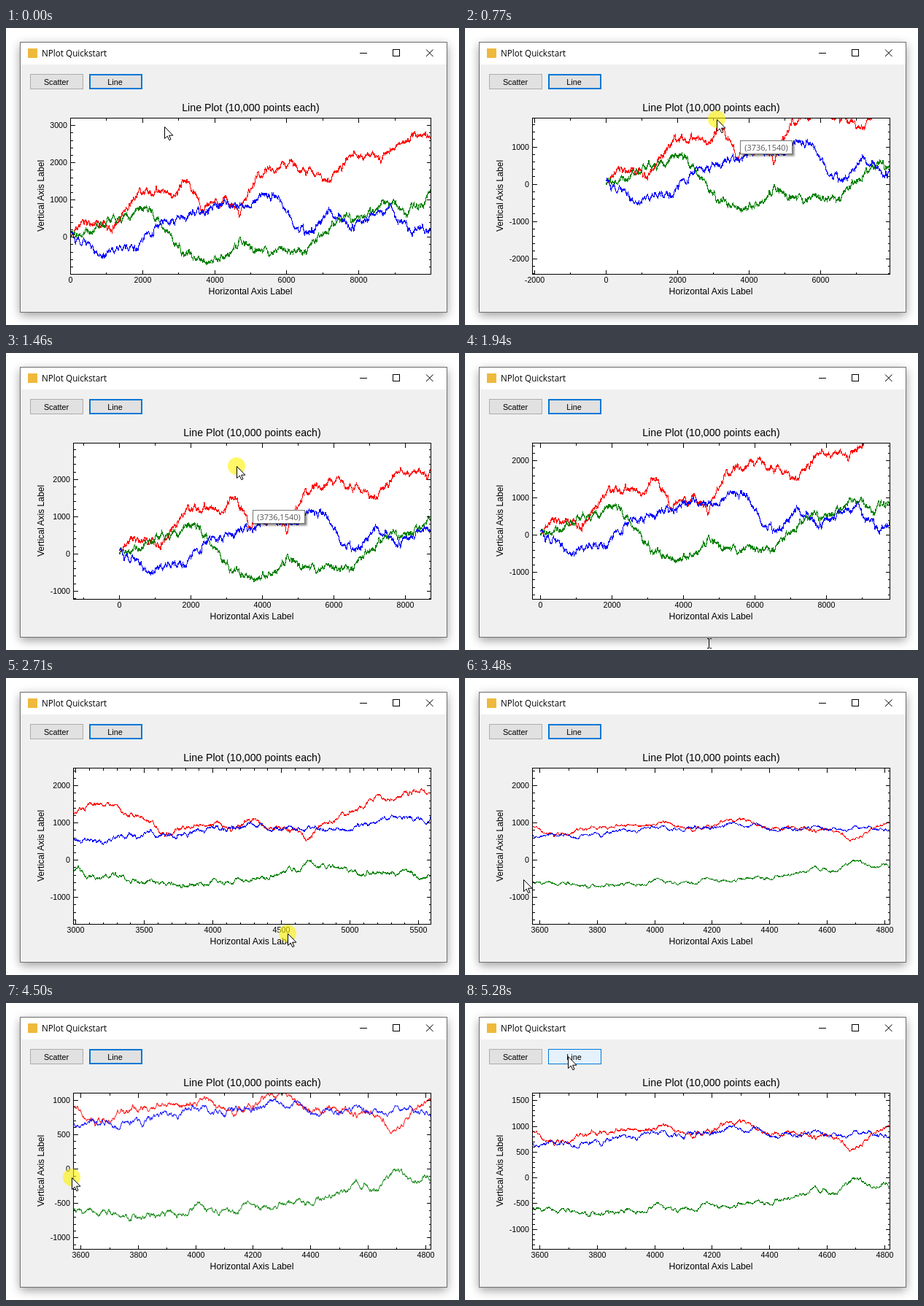
These frames come from a looping animation (621x407 px, 5.36 s). An HTML page:

```html
<!DOCTYPE html>
<html lang="en">
<head>
<meta charset="utf-8">
<title>Line Plot</title>
<style>
  html, body { margin: 0; width: 100%; height: 100%; overflow: hidden; background: #fff; }
  svg { display: block; width: 621px; height: 407px; }
  text { font-family: "Liberation Sans", Arial, sans-serif; }
  .ui { font-family: "Open Sans", "Noto Sans", sans-serif; }
  .mid { text-anchor: middle; }
  .crisp { shape-rendering: crispEdges; fill: none; stroke: #000; }
  .walk { fill: none; stroke-width: 1; stroke-linejoin: bevel; vector-effect: non-scaling-stroke; shape-rendering: crispEdges; }
</style>
</head>
<body>
<svg viewBox="0 0 621 407">
  <defs>
    <filter id="shadow" x="-10%" y="-10%" width="120%" height="125%">
      <feDropShadow dx="0" dy="4" stdDeviation="7" flood-color="#000" flood-opacity=".4"/>
    </filter>
    <filter id="tipShadow" x="-10%" y="-20%" width="125%" height="160%">
      <feDropShadow dx="2.5" dy="2.5" stdDeviation="1.2" flood-color="#000" flood-opacity=".45"/>
    </filter>
    <clipPath id="plotClip"><rect id="clipBox" y="124" height="213"/></clipPath>
  </defs>

  <rect x="19.5" y="19.5" width="585" height="370" fill="#f0f0f0" filter="url(#shadow)"/>
  <rect x="19.5" y="19.5" width="585" height="370" fill="#f0f0f0" stroke="#707070"/>
  <rect x="20" y="20" width="584" height="30" fill="#fff"/>
  <rect x="30" y="28" width="13" height="13" fill="#efb93c"/>
  <text class="ui" x="49" y="39" font-size="11.7">NPlot Quickstart</text>
  <path class="crisp" d="M485 34.5h10M530.5 29.5h9v9h-9z"/>
  <path d="M576 29.5l9.5 9.5m0-9.5l-9.5 9.5" stroke="#000" fill="none"/>

  <rect x="33.5" y="63.5" width="72" height="20" fill="#e1e1e1" stroke="#adadad"/>
  <text class="mid" x="69" y="78" font-size="10.8">Scatter</text>
  <rect id="lineButton" stroke="#0078d7"/>
  <text class="mid" x="149.5" y="78" font-size="10.8">Line</text>

  <text id="title" class="mid" y="114" font-size="14.2">Line Plot (10,000 points each)</text>
  <text id="xTitle" class="mid" y="365" font-size="12.3">Horizontal Axis Label</text>
  <text class="mid" transform="translate(52 230) rotate(-90)" font-size="12.1">Vertical Axis Label</text>

  <rect id="plotBack" y="123.5" height="214" fill="#fff"/>
  <g id="walks" clip-path="url(#plotClip)"></g>
  <path id="axes" class="crisp"/>
  <g id="labels" font-size="10.7"></g>

  <g id="tip">
    <rect x=".5" y=".5" width="71" height="18" fill="#fff" stroke="#767676" filter="url(#tipShadow)"/>
    <text id="tipText" class="ui mid" x="36" y="13.5" font-size="11" fill="#575757"></text>
  </g>
  <g id="pointer">
    <circle id="halo" r="12" fill="#fff200" opacity=".6"/>
    <path id="arrow" d="M.5.5V16.6L4.2 13.1L6.8 18.7L9 17.7L6.6 12.2H11.9Z" fill="#fff" stroke="#000"/>
    <path id="beam" class="crisp" d="M-3 -6.5h2.5v13h-2.5M3 -6.5h-2.5M3 6.5h-2.5"/>
  </g>
</svg>
<script>
const $ = id => document.getElementById(id);
const set = (el, attrs) => { for (const k in attrs) el.setAttribute(k, attrs[k]); };
const clamp = (v, lo, hi) => Math.min(hi, Math.max(lo, v));
const make = (tag, parent, attrs) => {
  const el = document.createElementNS("http://www.w3.org/2000/svg", tag);
  set(el, attrs);
  return parent.appendChild(el);
};

const LOOP = 5360, STEP = LOOP / 69, LEAD = 20; // the screen recorder's frame rhythm
const TOP = 123.5, BOTTOM = 337.5, RIGHT = 582.5, COUNT = 9999;
const DRAG = { from: 300, to: 1610, x: 275, y: 207, lag: 100 };
const ZOOM_X = { from: 2330, to: 2980, at: 305 };
const ZOOM_Y = { from: 3640, to: 4680, at: 275.5 };
const ZOOM_RATE = 60; // pixels of drag per e-fold

// Pointer key poses: [time, x, y]
const poses = [
  [0, 217, 135], [300, 275, 207], [540, 370, 208], [677, 377, 134.5], [777, 345, 125], [910, 264, 143],
  [1065, 244.5, 220], [1165, 276, 247], [1350, 340, 205], [1500, 310, 152], [1610, 286, 170],
  [1942, 335, 398], [2330, 305, 347], [2980, 430, 352], [3495, 80, 276], [3640, 83, 275.5],
  [4180, 90, 215], [4350, 90, 215], [4505, 90, 238.5], [4680, 92, 256], [4820, 200, 206], [5282, 141, 73]
];

// Cubic path through the poses that rests at every turning point
function pointerAt(t) {
  const last = poses.length - 1;
  const i = clamp(poses.findLastIndex(p => p[0] <= t), 0, last - 1);
  const slope = (j, k) => {
    if (j === 0 || j === last) return 0;
    const [a, b, c] = [poses[j - 1], poses[j], poses[j + 1]];
    return (b[k] - a[k]) * (c[k] - b[k]) <= 0 ? 0 : (c[k] - a[k]) / (c[0] - a[0]);
  };
  const a = poses[i], b = poses[i + 1], h = b[0] - a[0], u = clamp((t - a[0]) / h, 0, 1);
  const along = k => {
    const m0 = slope(i, k) * h, m1 = slope(i + 1, k) * h, rise = b[k] - a[k];
    return a[k] + u * (m0 + u * (3 * rise - 2 * m0 - m1 + u * (m0 + m1 - 2 * rise)));
  };
  return { x: along(1), y: along(2) };
}

function random(seed) {
  return () => {
    seed = (seed + 0x6D2B79F5) | 0;
    let r = Math.imul(seed ^ seed >>> 15, 1 | seed);
    r = r + Math.imul(r ^ r >>> 7, 61 | r) ^ r;
    return ((r ^ r >>> 14) >>> 0) / 4294967296;
  };
}

// Mean-reverting random walk around straight runs between turning points
function addWalk(color, seed, turns) {
  const rnd = random(seed);
  let d = "", noise = 0, k = 0;
  for (let x = 0; x <= COUNT; x++) {
    if (x > turns[k + 1][0]) k++;
    const [x0, y0] = turns[k], [x1, y1] = turns[k + 1];
    const y = y0 + (y1 - y0) * (x - x0) / (x1 - x0) + noise;
    d += `${x ? "L" : "M"}${x} ${y.toFixed(1)}`;
    noise = noise * .985 + (rnd() - .5) * 44;
  }
  return make("path", $("walks"), { class: "walk", stroke: color, d });
}

const walks = [
  addWalk("#f00", 11, [[0, 0], [400, 580], [1150, 180], [1900, 1220], [2900, 1200], [3230, 1540], [3650, 750],
    [4350, 1010], [4700, 620], [5200, 1660], [6150, 2040], [7200, 1500], [7700, 2160], [8500, 2150],
    [9860, 2830], [10000, 2620]]),
  addWalk("#008000", 23, [[0, 50], [700, 200], [1450, 620], [2100, 850], [2500, 380], [3000, -300], [3720, -730],
    [4250, -640], [4720, -100], [5000, -340], [6500, -380], [7300, 380], [8000, 600], [8700, 920],
    [9500, 750], [10000, 1180]]),
  addWalk("#00f", 37, [[0, 100], [800, -500], [1800, -180], [2500, 360], [3600, 630], [4200, 970], [4700, 760],
    [5600, 1180], [6300, 190], [6750, 150], [7200, 700], [7800, 250], [8900, 780], [9500, 100],
    [9800, 250], [10000, 70]])
];

function ticks(lo, hi) {
  const rough = (hi - lo) / 7, power = 10 ** Math.floor(Math.log10(rough));
  const lead = [1, 2, 5, 10].find(m => m * power >= rough);
  const step = lead * power, parts = lead === 2 ? 2 : 5, out = [];
  for (let i = Math.ceil(lo * parts / step); i <= hi * parts / step; i++)
    out.push({ value: Math.round(i * step / parts), major: i % parts === 0 });
  return out;
}

function viewAt(t) {
  const grab = pointerAt(clamp(t - DRAG.lag, DRAG.from, DRAG.to));
  let left = -(grab.x - DRAG.x) * COUNT / 494, span = COUNT;
  const zoomX = Math.exp((pointerAt(clamp(t, ZOOM_X.from, ZOOM_X.to)).x - ZOOM_X.at) / ZOOM_RATE);
  const center = left + (ZOOM_X.at - 92.5) / 490 * span;
  left = center - (center - left) / zoomX;
  span /= zoomX;

  const zoomY = Math.exp((ZOOM_Y.at - pointerAt(clamp(t, ZOOM_Y.from, ZOOM_Y.to)).y) / ZOOM_RATE);
  const zero = 286.6 + grab.y - DRAG.y;
  return { grab, left, span, ky: .051 * zoomY, y0: ZOOM_Y.at + (zero - ZOOM_Y.at) * zoomY };
}

function drawPlot({ left, span, ky, y0 }) {
  const yTicks = ticks((y0 - BOTTOM) / ky, (y0 - TOP) / ky);
  const wide = yTicks.some(k => k.major && String(k.value).length > 4);
  const x = wide ? 92.5 : 88.5, width = RIGHT - x, kx = width / span, x0 = x - left * kx;

  walks.forEach(w => w.setAttribute("transform", `matrix(${kx} 0 0 ${-ky} ${x0} ${y0})`));
  set($("clipBox"), { x, width });
  set($("plotBack"), { x, width });
  $("title").setAttribute("x", x + width / 2);
  $("xTitle").setAttribute("x", x + width / 2 - .5);

  const labels = $("labels");
  labels.textContent = "";
  let d = `M${x} ${TOP}H${RIGHT}V${BOTTOM}H${x}Z`;
  for (const { value, major } of ticks(left, left + span)) {
    const px = Math.floor(x0 + value * kx) + .5, size = major ? 6 : 3;
    d += `M${px} ${TOP}v${size}M${px} ${BOTTOM}v${-size}`;
    if (major) make("text", labels, { x: px, y: 349, class: "mid" }).textContent = value;
  }
  for (const { value, major } of yTicks) {
    const py = Math.floor(y0 - value * ky) + .5, size = major ? 6 : 3;
    d += `M${x} ${py}h${size}M${RIGHT} ${py}h${-size}`;
    if (major) make("text", labels, { x: x - 4.5, y: py + 3.7, "text-anchor": "end" }).textContent = value;
  }
  $("axes").setAttribute("d", d);
  return wide;
}

function render(t) {
  const view = viewAt(t), wide = drawPlot(view), p = pointerAt(t);
  const show = (id, on) => $(id).setAttribute("visibility", on ? "visible" : "hidden");
  const within = ({ from, to }, extra = 0) => t >= from && t <= to + extra;

  show("tip", within(DRAG, DRAG.lag));
  $("tip").setAttribute("transform", `translate(${Math.round(view.grab.x)} ${Math.round(view.grab.y + 19)})`);
  $("tipText").textContent = `(${wide ? 3736 : 3792},1540)`;

  const overText = p.y > 390;
  show("arrow", !overText);
  show("beam", overText);
  show("halo", within(DRAG) || within(ZOOM_X) || within(ZOOM_Y));
  $("pointer").setAttribute("transform", `translate(${Math.round(p.x)} ${Math.round(p.y)})`);

  const hover = p.x > 114 && p.x < 187 && p.y > 63 && p.y < 84;
  set($("lineButton"), hover
    ? { x: 114.5, y: 63.5, width: 72, height: 20, fill: "#e5f1fb", "stroke-width": 1 }
    : { x: 115, y: 64, width: 71, height: 19, fill: "#e1e1e1", "stroke-width": 2 });
}

let shown = -1;
const start = performance.now();
function frame() {
  const now = (performance.now() - start) % LOOP;
  const step = Math.floor((now + LEAD) / STEP) % 69;
  if (step !== shown) render((shown = step) * STEP);
  requestAnimationFrame(frame);
}
frame();
</script>
</body>
</html>
```
